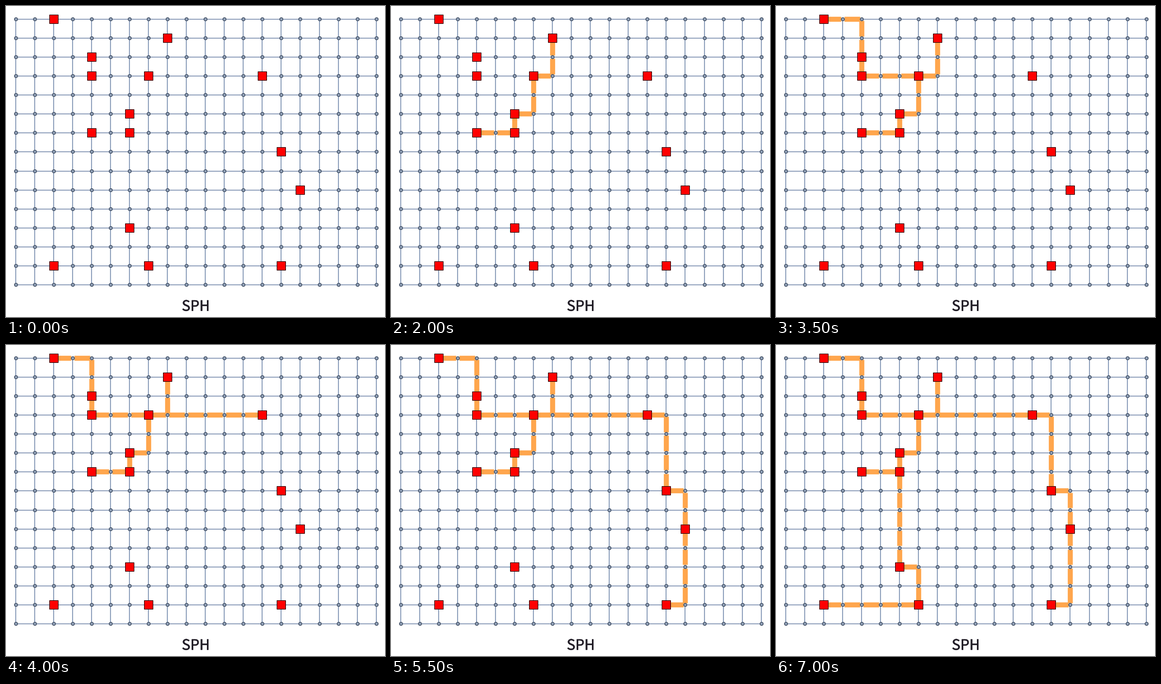
A matplotlib script for the animation above (7500 ms loop, 700x575 px).

```python
import matplotlib.pyplot as plt
from matplotlib.animation import FuncAnimation
from matplotlib.collections import LineCollection
from matplotlib.patheffects import withStroke

W, H, DPI = 700, 575, 100
PX = 72 / DPI
COLS, ROWS, STEP = 20, 15, 35.05
X0, Y0 = 17.7, 24.1
TRIM = 3.2
INK = "#211d26"

START = (8, 1)
TERMINALS = [START, (2, 0), (4, 2), (4, 3), (7, 3), (13, 3), (6, 5), (4, 6),
             (6, 6), (14, 7), (15, 9), (6, 11), (2, 13), (7, 13), (14, 13)]


def pos(node):
    return X0 + STEP * node[0], Y0 + STEP * node[1]


def straight(a, b):
    """Grid nodes on the line from a to b, both included."""
    n = max(abs(b[0] - a[0]), abs(b[1] - a[1]), 1)
    return [(a[0] + (b[0] - a[0]) * i // n, a[1] + (b[1] - a[1]) * i // n)
            for i in range(n + 1)]


def route(a, b):
    """L-shaped path: along the left end's row, up or down the right column."""
    left, right = sorted((a, b))
    corner = right[0], left[1]
    return straight(a, corner) + straight(corner, b)[1:]


def closest_pair(tree, waiting):
    """Nearest tree node and terminal; ties go to the rightmost."""
    def cost(pair):
        a, t = pair
        return abs(a[0] - t[0]) + abs(a[1] - t[1]), -t[0], -a[0]
    return min(((a, t) for a in tree for t in waiting), key=cost)


def trimmed(a, b):
    """Edge between neighbouring nodes, shortened at both ends."""
    (xa, ya), (xb, yb) = pos(a), pos(b)
    dx, dy = TRIM * (b[0] - a[0]), TRIM * (b[1] - a[1])
    return [(xa + dx, ya + dy), (xb - dx, yb - dy)]


def grow_tree():
    """Shortest path heuristic: the tree's edges after each joined terminal."""
    tree, waiting, edges = [START], TERMINALS[1:], []
    stages = [[]]
    while waiting:
        a, t = closest_pair(tree, waiting)
        path = route(a, t)
        edges = edges + [trimmed(p, q) for p, q in zip(path, path[1:]) if p != q]
        tree += path[1:]
        waiting = [w for w in waiting if w not in tree]
        stages.append(edges)
    return stages


STAGES = grow_tree()

fig = plt.figure(figsize=(W / DPI, H / DPI), dpi=DPI, facecolor="white")
ax = fig.add_axes([0, 0, 1, 1])
ax.set_xlim(0, W)
ax.set_ylim(H, 0)
ax.axis("off")


def add_lines(segments, color, width, z):
    lines = LineCollection(segments, colors=color, linewidths=width * PX,
                           capstyle="butt", zorder=z)
    ax.add_collection(lines)
    return lines


def add_marks(points, shape, size, fill, edge, width, z):
    ax.plot(*zip(*map(pos, points)), shape, ms=size * PX, mfc=fill, mec=edge,
            mew=width * PX, zorder=z)


add_lines([[pos((c, 0)), pos((c, ROWS - 1))] for c in range(COLS)],
          "#8a9cba", 1.8, 1)
add_lines([[pos((0, r)), pos((COLS - 1, r))] for r in range(ROWS)],
          "#7388ab", 1.45, 1)
links = add_lines([], "#ffa64d", 9.3, 2)
add_marks([(c, r) for c in range(COLS) for r in range(ROWS)],
          "o", 5.8, "#98a8bf", "#3f4d62", 1.35, 3)
add_marks(TERMINALS, "s", 15.5, "#ff0000", "#2a0808", 1.1, 4)

ax.text(350.5, 563.5, "SPH", ha="center", va="baseline", color=INK,
        family="Noto Sans CJK JP", size=26.5 * PX,
        path_effects=[withStroke(linewidth=0.6 * PX, foreground=INK)])


def update(i):
    links.set_segments(STAGES[i])
    return links,


anim = FuncAnimation(fig, update, frames=len(STAGES), interval=500,
                     repeat=True, repeat_delay=0, blit=False)
plt.show()
```
